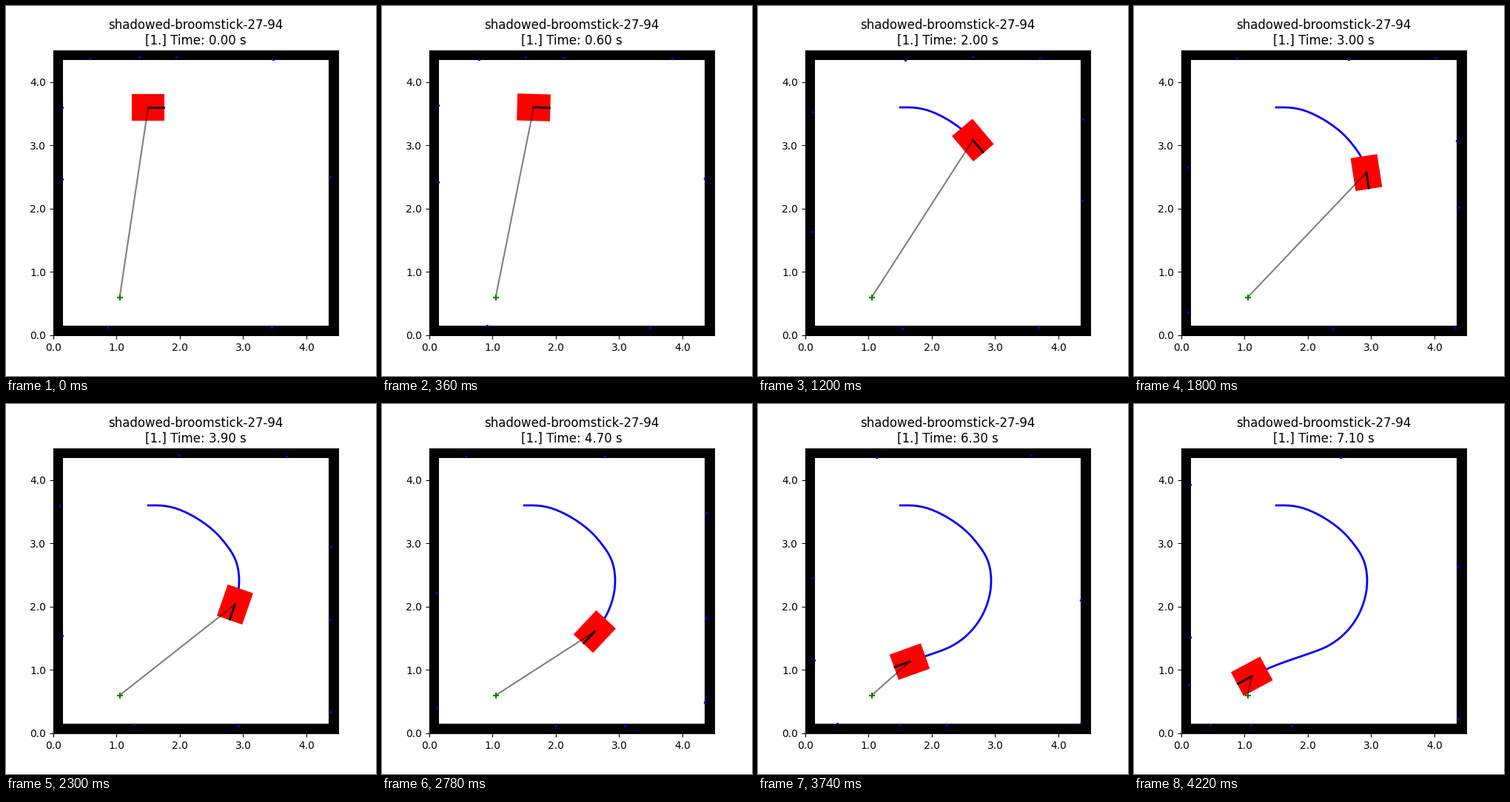
Write a matplotlib script that moves like this. It is 500 px wide and 500 px high and loops after 4240 ms.

```python
import numpy as np
import matplotlib.pyplot as plt
from matplotlib.animation import FuncAnimation
from matplotlib.patches import Rectangle
from matplotlib.transforms import Affine2D

SIZE, WALL = 4.5, 0.15
GOAL = (1.05, 0.6)
ROBOT_W, ROBOT_H = 0.5, 0.4
DT, STEPS = 0.1, 72
TICK, TICKS = 20, 212  # poses alternate between 20 ms and 100 ms

# waypoints: time, x, y
WAY = np.array([(0, 1.5, 3.6), (0.41, 1.569, 3.6), (1.1, 2.002, 3.53), (2, 2.649, 3.083),
                (3, 2.925, 2.57), (5.5, 2.177, 1.316), (7.1, 1.116, 0.901)])

# beams fan out evenly from the rear, leaving a slightly wider gap in front
BEAMS = np.radians(180 + 39.78 * np.arange(-4, 5))
RANGES = 0.0504 * np.arange(1, 130)


def velocity(t):
    """Drive off, turn right at a steady rate, then ease back to the left."""
    speed = np.interp(t, [0, 1.1, 3, 7.1], [0, 0.9, 0.59, 0.76])
    turn = np.radians(np.interp(t, [0.41, 5.5, 7.1], [0, -159.5, -151.8]))
    return speed * np.array([np.cos(turn), np.sin(turn)])


def pose(t):
    """Position and heading on a cubic Hermite path through the waypoints."""
    i = np.clip(np.searchsorted(WAY[:, 0], t, side="right") - 1, 0, len(WAY) - 2)
    (t0, *p), (t1, *q) = WAY[i], WAY[i + 1]
    h = t1 - t0
    s = (t - t0) / h
    p, step = np.array(p), np.subtract(q, p)
    v, w = velocity(t0), velocity(t1)
    pos = p + step * s * s * (3 - 2 * s) + h * s * (1 - s) * (v * (1 - s) - w * s)
    vel = step * 6 * s * (1 - s) / h + v * (1 - s) * (1 - 3 * s) + w * s * (3 * s - 2)
    return *pos, np.arctan2(vel[1], max(vel[0], 0) if t == 0 else vel[0])


def scan(x, y, heading):
    """March each beam until it enters a wall."""
    ang = heading + BEAMS[:, None]
    pts = np.stack([x + RANGES * np.cos(ang), y + RANGES * np.sin(ang)], axis=-1)
    blocked = ((pts < WALL) | (pts > SIZE - WALL)).any(axis=-1)
    return pts[np.arange(len(BEAMS)), blocked.argmax(axis=1)]


PATH = np.array([pose(k * DT) for k in range(STEPS)])

fig, ax = plt.subplots(figsize=(5, 5), dpi=100)
cells = round(SIZE / WALL)
grid = np.ones((cells, cells))
grid[1:-1, 1:-1] = 0
ax.imshow(grid, cmap="gray_r", extent=(0, SIZE, 0, SIZE), interpolation="nearest")
for axis in (ax.xaxis, ax.yaxis):
    axis.set_ticks(range(5))
    axis.set_major_formatter("{x:.1f}")

trail, = ax.plot([], [], "b-", lw=2, zorder=1)
body = ax.add_patch(Rectangle((-ROBOT_W / 2, -ROBOT_H / 2), ROBOT_W, ROBOT_H,
                              color="red", lw=1.5, zorder=1.5))
nose, = ax.plot([], [], "k-", lw=2)
bearing, = ax.plot([], [], "k-", lw=1.5, alpha=0.5)
hits = ax.scatter([], [], s=1, color="blue", lw=1.5, zorder=2)
ax.scatter(*GOAL, s=36, marker="+", color="green", lw=1.5, zorder=2)
ax.set_xlim(0, SIZE)
ax.set_ylim(0, SIZE)
title = ax.set_title("")


def update(tick):
    k = 2 * (tick // 6) + (tick % 6 > 0)
    x, y, heading = PATH[k]
    trail.set_data(PATH[:k + 1, 0], PATH[:k + 1, 1])
    body.set_transform(Affine2D().rotate(heading).translate(x, y) + ax.transData)
    reach = ROBOT_W / 2
    nose.set_data([x, x + reach * np.cos(heading)], [y, y + reach * np.sin(heading)])
    bearing.set_data([x, GOAL[0]], [y, GOAL[1]])
    hits.set_offsets(scan(x, y, heading))
    title.set_text(f"shadowed-broomstick-27-94\n[1.] Time: {k * DT:.2f} s")
    return trail, body, nose, bearing, hits, title


anim = FuncAnimation(fig, update, frames=TICKS, interval=TICK, repeat=True,
                     repeat_delay=0, blit=False)
plt.show()
```
